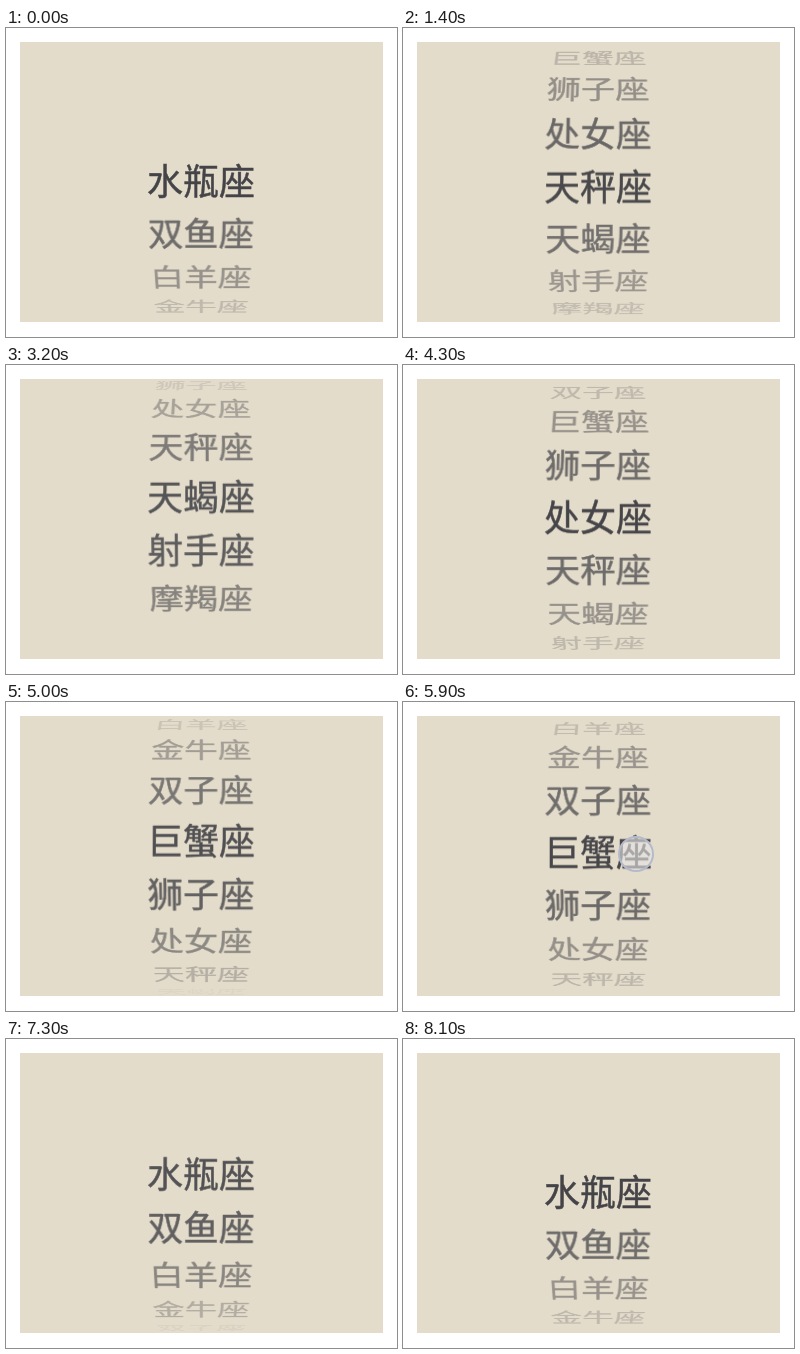
Recreate the animation shown at these times as an HTML page. Size 391x309 px, loop 8600 ms.

```html
<!DOCTYPE html>
<html lang="zh-CN">
<head>
<meta charset="utf-8">
<title>星座滚轮</title>
<style>
html, body { margin: 0; width: 100%; height: 100%; overflow: hidden; background: #fff; }
#wheel {
  position: absolute; left: 14px; top: 14px; width: 363px; height: 280px;
  overflow: hidden; background: #e4dccb;
}
#wheel div {
  position: absolute; left: 0; top: 115px; width: 362px; height: 48px;
  font: 36px/44px "Noto Sans CJK SC", "Noto Sans CJK", sans-serif;
  -webkit-text-stroke: .5px; color: #444448; text-align: center; white-space: nowrap;
}
#touch {
  position: absolute; left: 215px; top: 134px; width: 32px; height: 32px;
  border: 2px solid #b4bacb; border-radius: 50%; background: rgba(230, 229, 228, .6);
}
</style>
</head>
<body>
<div id="wheel"></div>
<div id="touch"></div>
<script>
const signs = '水瓶 双鱼 白羊 金牛 双子 巨蟹 狮子 处女 天秤 天蝎 射手 摩羯'.split(' ');
const LOOP = 8600, TICK = 100, RADIUS = 188, STEP = 16.5, TOUCH = 5900;

// Each swipe turns the wheel by a number of rows; tau sets how fast it settles.
const swipes = [
  { start: 400, rows: 11, tau: 396 },
  { start: 2900, rows: -2, tau: 100 },
  { start: 3900, rows: -3.95, tau: 237 },
  { start: TOUCH, rows: -5.05, tau: 318 }
];

const wheel = document.getElementById('wheel');
const touch = document.getElementById('touch');
const rows = signs.map(name => {
  const row = document.createElement('div');
  row.textContent = name + '座';
  return wheel.appendChild(row);
});

// Critically damped spring that snaps to rest at the end of its tail.
function spring(x) {
  if (x <= 0) return 0;
  return x > 6.3 ? 1 : 1 - (1 + x) * Math.exp(-x);
}

function draw() {
  const t = Math.floor(performance.now() % LOOP / TICK) * TICK;
  const pos = swipes.reduce((sum, s) => sum + s.rows * spring((t - s.start) / s.tau), 0);
  rows.forEach((row, i) => {
    const d = i - pos;
    row.style.opacity = Math.max(0, 1 - .255 * Math.abs(d));
    row.style.visibility = Math.abs(d) < 4 ? 'visible' : 'hidden';
    row.style.transform = `perspective(470px) translateZ(${-RADIUS}px) ` +
      `rotateX(${-d * STEP}deg) translateZ(${RADIUS}px)`;
  });
  touch.style.visibility = t === TOUCH ? 'visible' : 'hidden';
  requestAnimationFrame(draw);
}
draw();
</script>
</body>
</html>
```
